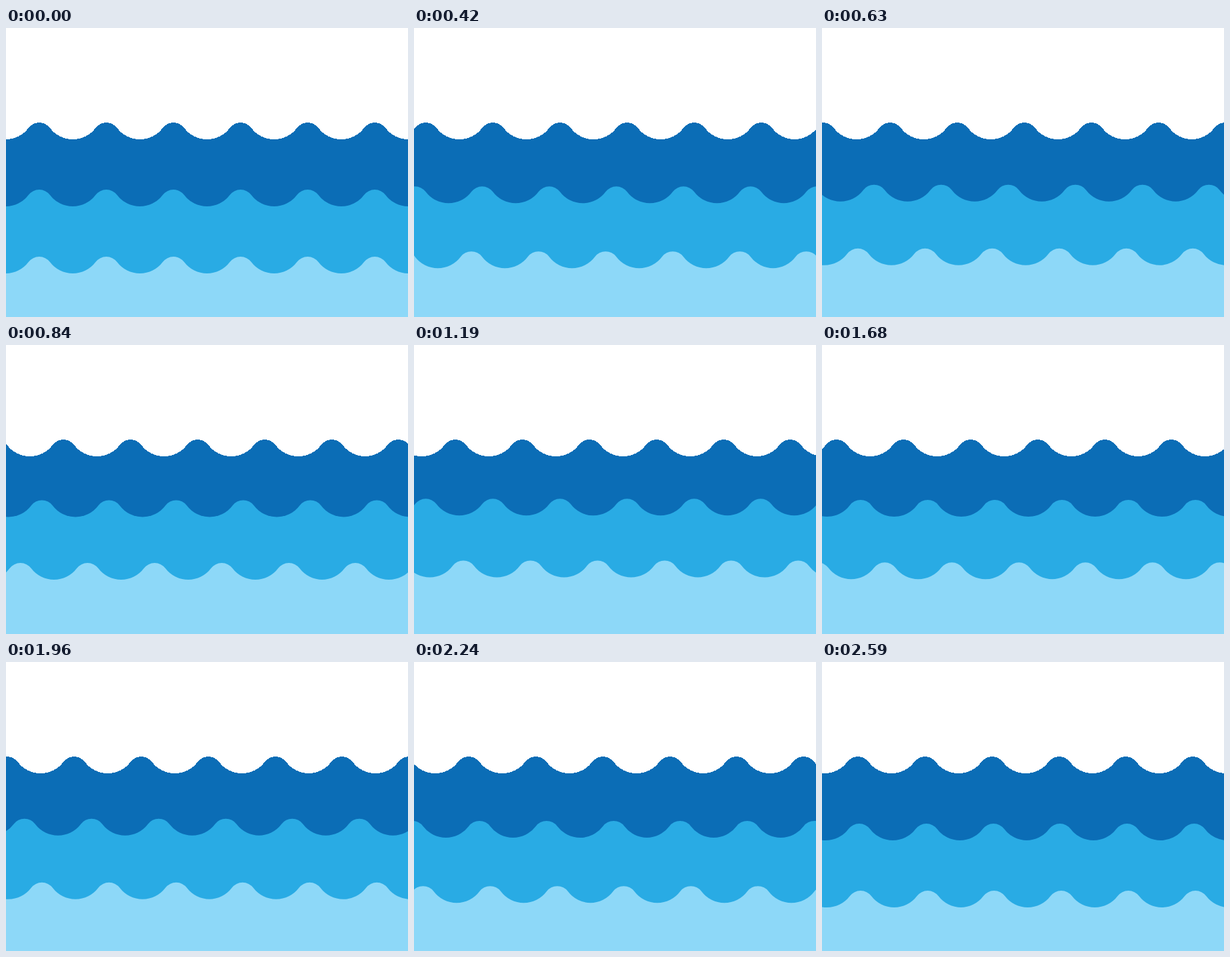
Recreate the animation shown at these times as an HTML page. Size 599 by 431 pixels, loop 2620 ms.

```html
<!DOCTYPE html>
<html lang="en">
<head>
<meta charset="utf-8">
<title>Waves</title>
<style>
  html, body { margin: 0; width: 100%; height: 100%; overflow: hidden; background: #fff; }
  svg { display: block; width: 599px; height: 431px; }
</style>
</head>
<body>
<svg id="sea" viewBox="0 0 599 431"></svg>
<script>
const NS = 'http://www.w3.org/2000/svg';
const LOOP = 2620, TICK = 70, LAST = 49;
const TILE = 599, CRESTS = 6, DEPTH = 320;

// speed: px to the left per step; lift: highest rise in px
const layers = [
  { color: '#0b6db6', y: 166.1, speed: 4, lift: 0, crisp: true },
  { color: '#29abe4', y: 266.1, speed: 6, lift: 12 },
  { color: '#8dd8f8', y: 366.1, speed: 8, lift: 20 }
];

// One period is a wide trough arc, a tight crest arc and a trough arc, all tangent.
const wave = 'a42.5 42.5 0 0 0 34-17a20 20 0 0 1 32 0a42.5 42.5 0 0 0 34 17';
const strip = x => `M${x - 0.5} 0${wave.repeat(CRESTS)}v${DEPTH}h${-100 * CRESTS}z`;
const shape = strip(0) + strip(TILE);

const sea = document.getElementById('sea');
for (const layer of layers) {
  layer.node = document.createElementNS(NS, 'path');
  layer.node.setAttribute('d', shape);
  layer.node.setAttribute('fill', layer.color);
  if (layer.crisp) layer.node.setAttribute('shape-rendering', 'crispEdges');
  sea.appendChild(layer.node);
}

// Steady start, soft stop at the top, then the same way back.
function rise(step) {
  const x = 1 - Math.abs(2 * step / LAST - 1);
  return x + x * x - x * x * x;
}

function draw(ms) {
  const tick = Math.floor((ms % LOOP) / TICK);
  const step = tick + Math.floor(tick / 3); // every fourth step is skipped
  for (const { node, y, speed, lift } of layers) {
    const top = y - lift * rise(step);
    node.setAttribute('transform', `translate(${-speed * step} ${top.toFixed(3)})`);
  }
}

const start = performance.now();
function loop(now) {
  draw(Math.max(0, now - start));
  requestAnimationFrame(loop);
}
draw(0);
requestAnimationFrame(loop);
</script>
</body>
</html>
```
